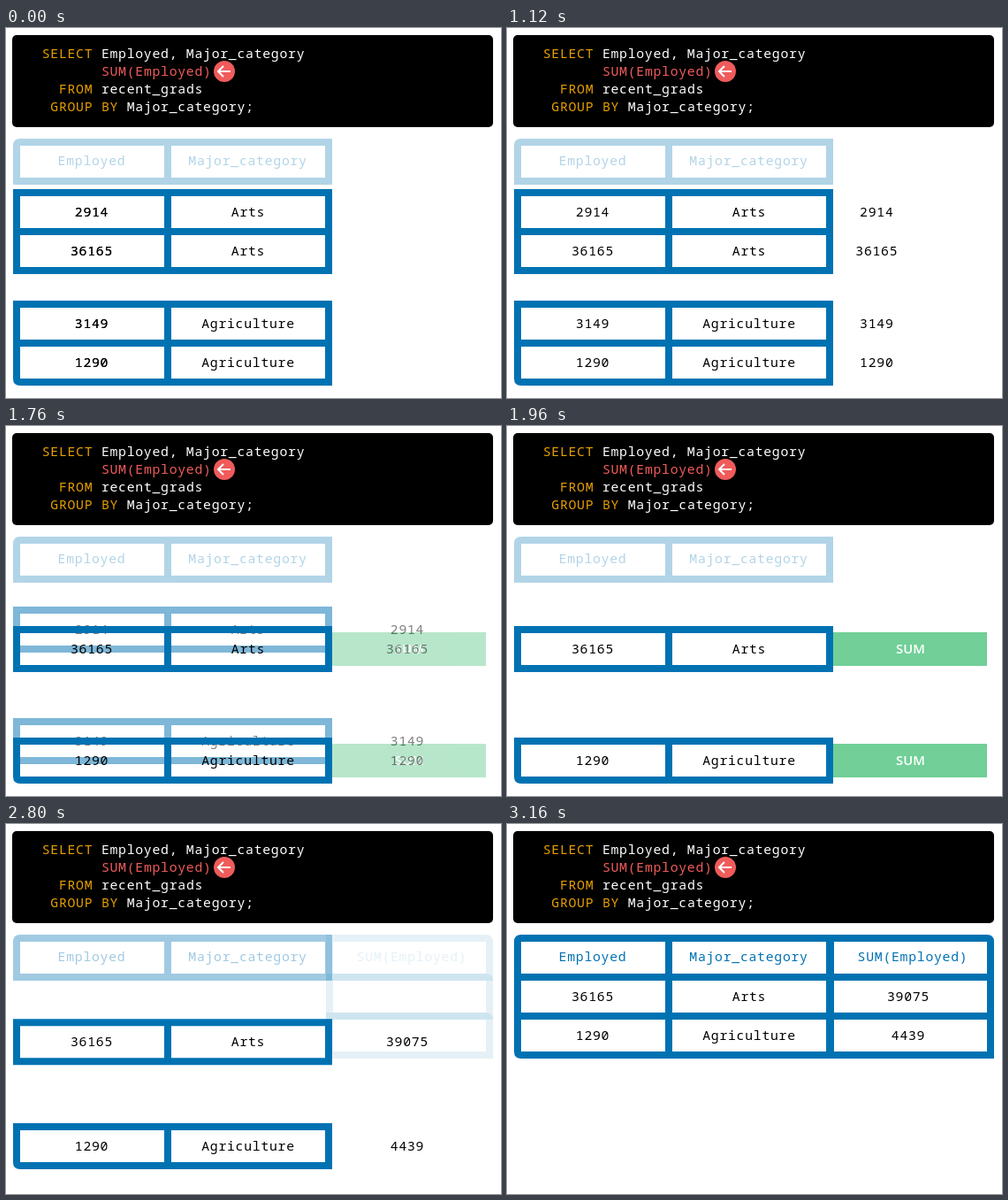
An HTML page for the animation above (5.2 s loop, 560 by 418 pixels).

```html
<!DOCTYPE html>
<html lang="en">
<head>
<meta charset="utf-8">
<title>GROUP BY with SUM</title>
<style>
  html, body { margin: 0; width: 100%; height: 100%; overflow: hidden; background: #fff; }
  svg { display: block; width: 560px; height: 418px; }
  text {
    font: 400 14.8px "Noto Sans Mono", "DejaVu Sans Mono", monospace;
    letter-spacing: .72px;
    white-space: pre;
  }
  .mid { text-anchor: middle; }
  .num { font-weight: 500; }
  .head { fill: #0072b2; }
  .sum { font: 600 14.8px "Open Sans", "Noto Sans", sans-serif; letter-spacing: 0; fill: #fff; }
  .key { fill: #e69f00; }
  .call { fill: #f05b5b; }
</style>
</head>
<body>
<svg id="stage" viewBox="0 0 560 418" xmlns="http://www.w3.org/2000/svg">
  <rect x="7" y="8" width="544" height="104" rx="5"/>
  <g fill="#fff">
    <text x="40.7" y="34"><tspan class="key">SELECT</tspan> Employed, Major_category</text>
    <text x="107.9" y="54" class="call">SUM(Employed)</text>
    <text x="59.9" y="74"><tspan class="key">FROM</tspan> recent_grads</text>
    <text x="50.3" y="94"><tspan class="key">GROUP BY</tspan> Major_category;</text>
  </g>
  <circle cx="247" cy="49" r="12" fill="#f05b5b"/>
  <path d="M254 49H240.5M246 43L240 49L246 55" fill="none" stroke="#fff" stroke-width="2"/>
</svg>
<script>
const LOOP = 5200, TICK = 40, ROW_H = 52, BORDER = 8, BASE = 31;
const BLUE = '#0072b2', GREEN = '#71cf97';
const LEFT_CELLS = [[16, 163], [187, 174]];
const stage = document.getElementById('stage');

function add(parent, tag, attrs = {}, content = '') {
  const el = document.createElementNS('http://www.w3.org/2000/svg', tag);
  for (const name in attrs) el.setAttribute(name, attrs[name]);
  el.textContent = content;
  parent.appendChild(el);
  return el;
}

const group = () => add(stage, 'g');
const label = (parent, x, y, str, cls = '') =>
  add(parent, 'text', { x, y, class: 'mid ' + cls }, str);

// A bordered row at y; tl, tr and bl are corner radii.
function frame(parent, y, x, right, cells, { tl = 0, tr = 0, bl = 0 } = {}) {
  const bottom = y + ROW_H;
  let d = `M${x + tl} ${y}H${right - tr}Q${right} ${y} ${right} ${y + tr}V${bottom}` +
    `H${x + bl}Q${x} ${bottom} ${x} ${bottom - bl}V${y + tl}Q${x} ${y} ${x + tl} ${y}Z`;
  for (const [cx, w] of cells) d += `M${cx} ${y + BORDER}h${w}v36h${-w}Z`;
  add(parent, 'path', { d, fill: BLUE, 'fill-rule': 'evenodd' });
}

function dataRow(y, count, category, corners) {
  const g = group();
  frame(g, y, 8, 369, LEFT_CELLS, corners);
  label(g, 97, y + BASE, count);
  label(g, 274, y + BASE, category);
  return g;
}

const header = group();
frame(header, 125, 8, 369, LEFT_CELLS, { tl: 8 });
add(header, 'rect', { x: 179, y: 132, width: 8, height: 38, fill: BLUE, opacity: .35 });
label(header, 97, 155, 'Employed', 'head');
label(header, 273.5, 155, 'Major_category', 'head');

const groups = [
  { y: 182, end: 169, category: 'Arts', counts: [2914, 36165], total: 39075 },
  { y: 308, end: 213, category: 'Agriculture', counts: [3149, 1290], total: 4439, corners: { bl: 8 } },
].map(({ y, end, category, counts, total, corners }) => {
  const low = y + 44;
  const upper = dataRow(y, counts[0], category);
  const lower = dataRow(low, counts[1], category, corners);
  const badge = group();
  add(badge, 'rect', { x: 369, y: low + 7, width: 174, height: 38, fill: GREEN });
  label(badge, 456.5, low + BASE, 'SUM', 'sum');
  const copies = counts.map((n, i) => label(stage, 97, y + 44 * i + BASE, n, 'num'));
  const result = label(stage, 454, low + BASE, total, 'num');
  return { upper, lower, badge, copies, result, rise: end - low };
});

const sumColumn = [125, 169, 213].map(y => {
  const g = group();
  frame(g, y, 362, 551, [[370, 173]], { tr: 8 });
  return g;
});
const sumHead = label(stage, 459, 155, 'SUM(Employed)', 'head');

const move = (el, x, y) => el.setAttribute('transform', `translate(${x} ${y})`);
const fade = (el, v) => el.setAttribute('opacity', v);

// Linear progress in equal ticks; the first tick lands on start.
const progress = (t, start, ticks) =>
  Math.max(0, Math.min(ticks, Math.floor((t - start) / TICK) + 1)) / ticks;

function draw(t) {
  const slide = progress(t, 800, 10);
  const merge = progress(t, 1600, 10);
  const reveal = progress(t, 2200, 5);
  const join = progress(t, 2800, 10);

  fade(header, .3 + .7 * join);
  for (const { upper, lower, badge, copies, result, rise } of groups) {
    move(upper, 0, 44 * merge);
    fade(upper, 1 - merge);
    move(lower, 0, rise * join);
    move(result, 0, rise * join);
    copies.forEach((copy, i) => {
      move(copy, 357 * slide, i ? 0 : 44 * merge);
      fade(copy, 1 - merge);
    });
    fade(badge, merge * (1 - reveal));
    fade(result, reveal);
  }
  for (const el of [...sumColumn, sumHead]) fade(el, join);
}

const begin = performance.now();
function tick() {
  draw((performance.now() - begin) % LOOP);
  requestAnimationFrame(tick);
}
draw(0);
requestAnimationFrame(tick);
</script>
</body>
</html>
```
